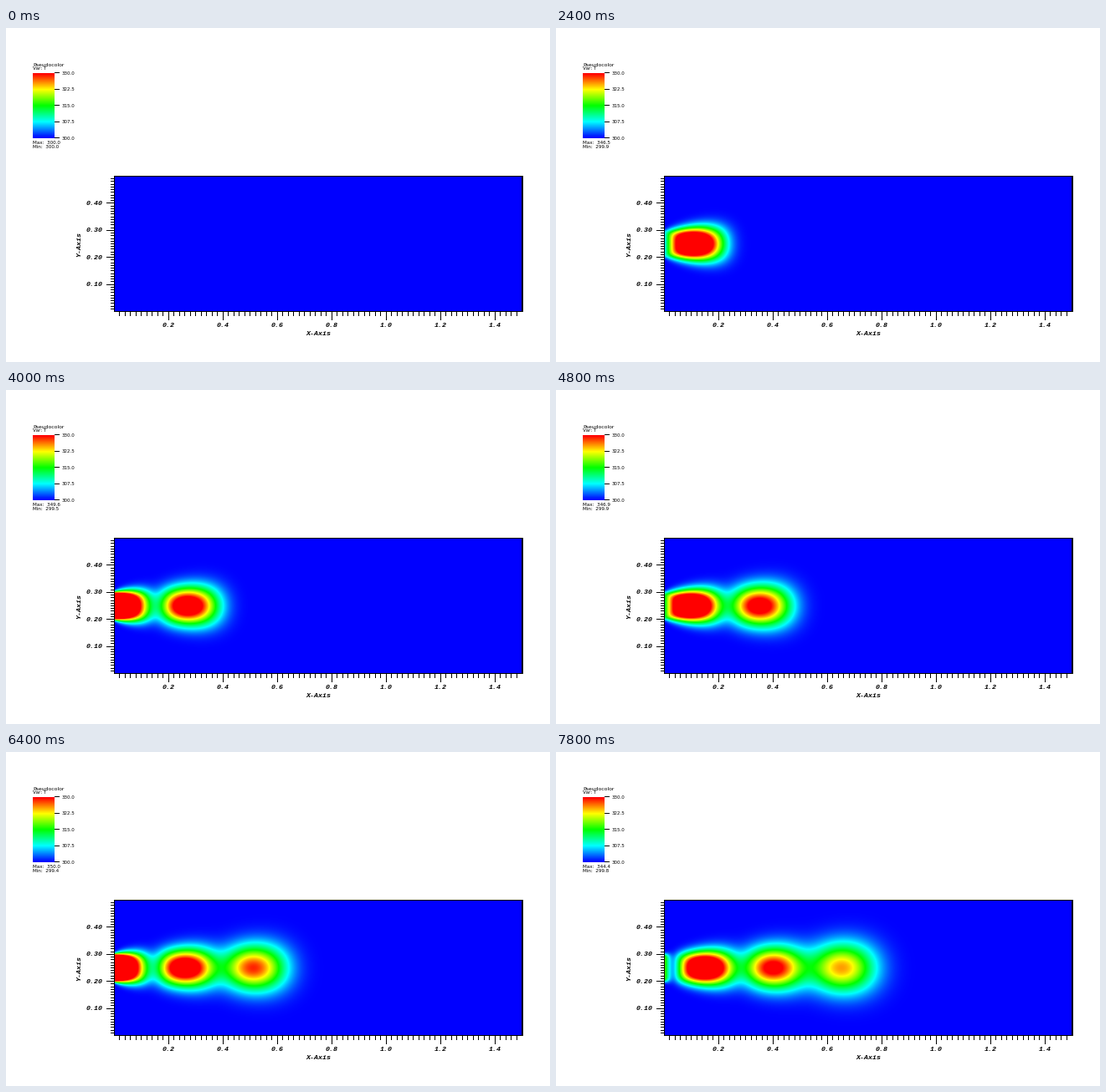
A matplotlib script for the animation above (8 s loop, 650 by 400 pixels).

```python
import math

import matplotlib.pyplot as plt
import numpy as np
from matplotlib.animation import FuncAnimation
from matplotlib.colors import LinearSegmentedColormap
from matplotlib.patches import Rectangle

W, H, DPI = 650, 400, 100
PX = 72 / DPI                      # one pixel in points
FRAMES, INTERVAL = 40, 200

# Plot box in pixels and its scale
LEFT, RIGHT, TOP, BOTTOM = 130, 617, 178, 340
X0, Y0, SCALE = 129.5, 339.7, 324.8

# Warm jet: inlet pulses carried downstream while diffusing (time in frames)
SPEED, KAPPA, PERIOD = 0.02, 4.6e-5, 12.5
T_COLD, T_RISE = 300, 50
JET_LOW, JET_HIGH, EDGE_BLUR = 0.2, 0.3, 0.005
OVERSHOOT, UNDERSHOOT = 1.018, 0.0115

erf = np.vectorize(math.erf)

# Quadrature over the age of the fluid, denser at small ages
N = 1200
s = (np.arange(N) + 0.5) / N
age = FRAMES * s**2
d_age = 2 * FRAMES * s / N

x = (np.arange(LEFT, RIGHT) + 0.5 - X0) / SCALE
y = (Y0 - np.arange(TOP, BOTTOM) - 0.5) / SCALE
spread_y = np.sqrt(4 * KAPPA * age + 2 * EDGE_BLUR**2)
across = 0.5 * (erf((y[:, None] - JET_LOW) / spread_y)
                - erf((y[:, None] - JET_HIGH) / spread_y))
spread_x = np.sqrt(4 * KAPPA * age)[:, None]
arrival = (x / (math.sqrt(math.pi) * spread_x * age[:, None])
           * np.exp(-((x - SPEED * age[:, None]) / spread_x)**2)
           * d_age[:, None])


def inlet(t):
    return T_RISE * np.abs(np.sin(np.pi * t / PERIOD))


def temperature(t):
    pulse = np.where(age < t, inlet(t - age), 0)
    return T_COLD + (across * pulse) @ arrival


fig = plt.figure(figsize=(W / DPI, H / DPI), dpi=DPI, facecolor="white")
ax = fig.add_axes([0, 0, 1, 1])
cmap = LinearSegmentedColormap.from_list(
    "heat", ["blue", "cyan", "lime", "yellow", "red"], N=512)


def show(data, left, right, top, bottom):
    return ax.imshow(data, cmap=cmap, vmin=300, vmax=330, aspect="auto",
                     extent=(left, right, bottom, top),
                     interpolation="nearest")


def bar(left, top, right, bottom):
    ax.add_patch(Rectangle((left, top), right - left, bottom - top,
                           facecolor="black", linewidth=0,
                           antialiased=False, zorder=2))


def hline(py, x1, x2):
    row = math.floor(py)
    bar(x1, row, x2, row + 1)


def vline(px, y1, y2):
    col = math.floor(px)
    bar(col, y1, col + 1, y2)


def axis_text(px, py, text, ha="center", va="center_baseline", rotation=0):
    ax.text(px, py, text, ha=ha, va=va, rotation=rotation,
            family="Liberation Mono", size=8.3 * PX,
            weight="bold", style="italic")


def legend_text(px, base, text, size):
    return ax.text(px, base, text, ha="left", va="baseline",
                   family="DejaVu Sans", size=size * PX)


# Temperature field with its frame
field = show(np.full((BOTTOM - TOP, RIGHT - LEFT), T_COLD),
             LEFT, RIGHT, TOP, BOTTOM)
hline(177, 129, 618)
hline(339, 129, 618)
vline(129, 177, 340)
bar(616, 177, 618, 340)

# Axes: every tenth tick is long and labelled
for i in range(1, 75):
    px = X0 + SCALE * 0.02 * i
    major = i % 10 == 0
    vline(px, 340, 350 if major else 345)
    if major:
        axis_text(px, 356, f"{0.02 * i:.1f}")
for i in range(1, 50):
    py = Y0 - SCALE * 0.01 * i
    major = i % 10 == 0
    hline(py, 120 if major else 125, 130)
    if major:
        axis_text(116, py - 0.4, f"{0.01 * i:.2f}", ha="right")
axis_text(373, 366, "X-Axis")
axis_text(88.3, 259, "Y-Axis", va="center", rotation=90)

# Colour legend
show(np.linspace(330, 300, 78)[:, None], 32, 58, 54, 132)
legend_text(32, 45.5, "Pseudocolor", 6.2)
legend_text(32, 50.2, "Var: T", 5.7)
for i in range(5):
    py = 53.5 + 19.5 * i
    hline(py, 58, 64)
    legend_text(66.5, py + 2.4, f"{330 - 7.5 * i:.1f}", 5.5)
max_text = legend_text(32, 139, "", 5.7)
min_text = legend_text(32, 144, "", 5.7)

ax.set_xlim(0, W)
ax.set_ylim(H, 0)
ax.axis("off")


def update(frame):
    temp = temperature(frame)
    hot = inlet(frame)
    field.set_data(temp)
    high = max(temp.max(), T_COLD + OVERSHOOT * hot)
    max_text.set_text(f"Max:  {high:.1f}")
    min_text.set_text(f"Min:  {T_COLD - UNDERSHOOT * hot:.1f}")
    return field, max_text, min_text


anim = FuncAnimation(fig, update, frames=FRAMES, interval=INTERVAL,
                     repeat=True, repeat_delay=0)
plt.show()
```
